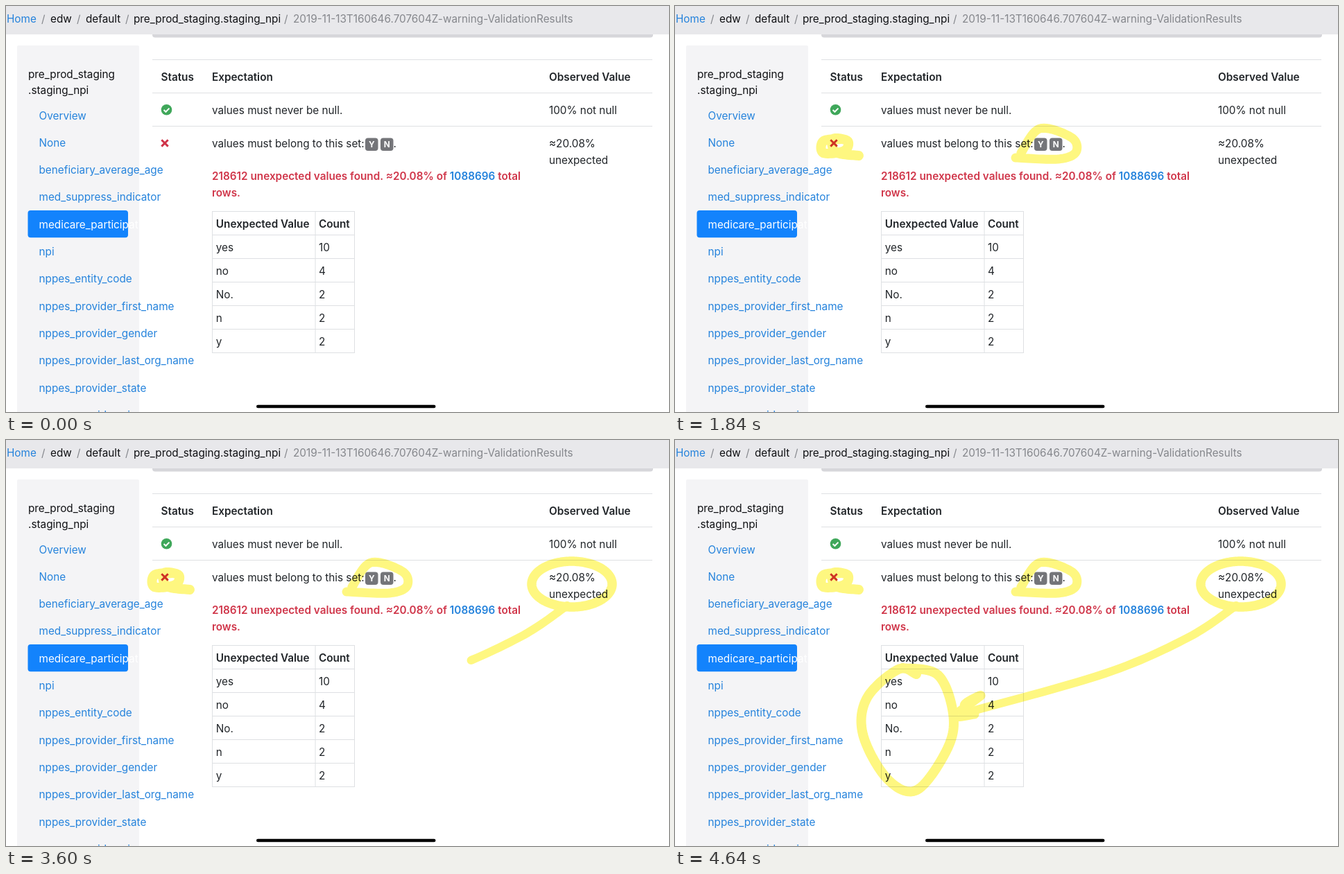
These frames come from a looping animation (956 px wide and 586 px high, 4740 ms). An HTML page with a canvas:

```html
<!DOCTYPE html>
<html lang="en">
<head>
<meta charset="utf-8">
<title>Validation results</title>
<style>
html, body { margin: 0; width: 100%; height: 100%; overflow: hidden; background: #fff; }
svg, canvas { position: absolute; left: 0; top: 0; width: 956px; height: 586px; }
canvas { mix-blend-mode: multiply; }
text { font: 15.3px Inter, "Open Sans", sans-serif; fill: #212529; white-space: pre; }
.b { font-weight: 600; }
.link { fill: #2583dc; }
.mute { fill: #85878c; }
.dark { fill: #101114; }
.red { fill: #d0364a; }
.white { fill: #fff; }
.tag { font-size: 11.8px; font-weight: 700; fill: #fff; }
</style>
</head>
<body>
<svg id="page" viewBox="0 0 956 586"></svg>
<canvas id="ink"></canvas>
<script>
const W = 956, H = 586, LOOP = 4740, STEP = 80;

// ---- static page ----
const text = (x, y, s, cls = '') => `<text x="${x}" y="${y}" class="${cls}">${s}</text>`;
const rect = (x, y, w, h, fill, r = 0) =>
  `<rect x="${x}" y="${y}" width="${w}" height="${h}" rx="${r}" fill="${fill}"/>`;
const line = (d, color = '#dee0e3', w = 1) =>
  `<path d="${d}" fill="none" stroke="${color}" stroke-width="${w}"/>`;

function header() {
  const slash = x => text(x, 24, '/', 'mute');
  return rect(211, 30, 722, 15.5, '#d6d6da', 4) + rect(0, 0, W, 41, '#e8e8eb') +
    text(1, 24, 'Home', 'link') + slash(51) +
    text(64, 24, 'edw', 'dark') + slash(102) +
    text(115, 24, 'default', 'dark') + slash(172) +
    text(184, 24, 'pre_prod_staging.staging_npi', 'dark') + slash(401) +
    text(414, 24, '2019-11-13T160646.707604Z-warning-ValidationResults', 'mute');
}

function sidebar() {
  const items = ['Overview', 'None', 'beneficiary_average_age', 'med_suppress_indicator',
    'medicare_participation_indicator', 'npi', 'nppes_entity_code',
    'nppes_provider_first_name', 'nppes_provider_gender', 'nppes_provider_last_org_name',
    'nppes_provider_state', 'nppes_provider_zip'];
  return rect(16, 57, 176, 540, '#f4f4f6', 2) + rect(31.5, 295, 144.5, 39.3, '#1383fc', 4) +
    text(32, 104, 'pre_prod_staging', 'dark') + text(32, 127, '.staging_npi', 'dark') +
    items.map((s, i) => text(47.5, 163.5 + i * 39.3, s, i === 4 ? 'white' : 'link')).join('');
}

function tag(x, letter) {
  return rect(x, 190.5, 18.5, 18.5, '#747579', 4) +
    `<text x="${x + 9.25}" y="204" class="tag" text-anchor="middle">${letter}</text>`;
}

function results() {
  let s = '';
  for (let i = 0; i < 3; i++) s += line(`M211 ${77.5 + i * 48}H932`);
  s += text(223.5, 108, 'Status', 'b') + text(297, 108, 'Expectation', 'b') +
    text(783, 108, 'Observed Value', 'b') +
    text(297, 155.5, 'values must never be null.') + text(783, 155.5, '100% not null') +
    text(297, 204, 'values must belong to this set:') + text(558.5, 204, '.') +
    text(783, 204, '≈20.08%') + text(783, 227.5, 'unexpected') +
    text(297, 251, '218612 unexpected values found. ≈20.08% of <tspan class="link">1088696</tspan> total', 'b red') +
    text(297, 274.5, 'rows.', 'b red');
  s += '<circle cx="231.5" cy="149.8" r="7.8" fill="#3fa75a"/>' +
    line('M227.6 150l2.8 2.8 5-5.2', '#fff', 2) +
    line('M224.3 193.2l9.4 9.4m0-9.4l-9.4 9.4', '#cf3348', 2.9);
  return s + tag(518, 'Y') + tag(540, 'N');
}

function counts() {
  const rows = [['Unexpected Value', 'Count'], ['yes', 10], ['no', 4], ['No.', 2], ['n', 2], ['y', 2]];
  let s = line('M297.5 296V501M446 296V501M502.5 296V501');
  for (let i = 0; i <= rows.length; i++) s += line(`M297 ${296.5 + i * 34}H503`);
  rows.forEach(([value, count], i) => {
    const y = 319.5 + i * 34, cls = i ? '' : 'b';
    s += text(302.8, y, value, cls) + text(451, y, count, cls);
  });
  return s;
}

document.getElementById('page').innerHTML = rect(0, 0, W, H, '#fff') + header() + sidebar() +
  results() + counts() + rect(361, 575.7, 258.5, 4.6, '#000', 2.3);

// ---- highlighter ----
// Catmull-Rom curve sampled into short segments
function smooth(p) {
  const out = [], at = i => p[Math.max(0, Math.min(p.length - 1, i))];
  for (let i = 0; i < p.length - 1; i++) {
    for (let k = 0; k < 14; k++) {
      const u = k / 14;
      out.push([0, 1].map(j => {
        const a = at(i - 1)[j], b = at(i)[j], c = at(i + 1)[j], d = at(i + 2)[j];
        return b + u * (c - a) / 2 + u * u * (a - 2.5 * b + 2 * c - d / 2) +
          u * u * u * (1.5 * (b - c) + (d - a) / 2);
      }));
    }
  }
  out.push(p[p.length - 1]);
  return out;
}

// counter-clockwise closed loop
function ring(cx, cy, rx, ry, start) {
  return Array.from({ length: 25 }, (_, i) => {
    const a = start - i / 24 * 2 * Math.PI;
    return [cx + rx * Math.cos(a), cy + ry * Math.sin(a)];
  });
}

const strokes = [];
const mark = (from, to, width, pts) => strokes.push({ from, to, width, pts: smooth(pts) });

mark(40, 480, 14, [[240, 192], [214, 195], [214, 212], [244, 209], [249, 195], [228, 192], [232, 211], [265, 216]]);
mark(600, 1440, 13, [[491, 219], [552, 221], [578, 211], [572, 190], [526, 177], [499, 212]]);
mark(1960, 2720, 13.5, ring(816, 208, 58, 33, -1.3));
mark(3440, 3860, 12, [[809, 239], [740, 285], [620, 337], [422, 393]]);
mark(3860, 4030, 13, [[422, 393], [418, 381], [441, 369], [404, 398], [432, 396]]);
mark(4040, 4640, 14, [[348, 338], [322, 331], [277, 372], [271, 425], [306, 489], [349, 505],
  [393, 445], [401, 395], [379, 339], [328, 329]]);

const canvas = document.getElementById('ink'), ctx = canvas.getContext('2d');
const scale = window.devicePixelRatio || 1;
canvas.width = W * scale;
canvas.height = H * scale;
ctx.scale(scale, scale);
ctx.lineCap = ctx.lineJoin = 'round';
ctx.strokeStyle = '#fef780';

function drawStroke({ from, to, width, pts }, t) {
  if (t <= from) return;
  const lens = pts.map((p, i) => i ? Math.hypot(p[0] - pts[i - 1][0], p[1] - pts[i - 1][1]) : 0);
  let left = lens.reduce((a, b) => a + b) * Math.min(1, (t - from) / (to - from));
  ctx.lineWidth = width;
  ctx.beginPath();
  ctx.moveTo(...pts[0]);
  for (let i = 1; i < pts.length && left > 0; i++) {
    const u = Math.min(1, left / (lens[i] || 1)), [x, y] = pts[i - 1];
    ctx.lineTo(x + (pts[i][0] - x) * u, y + (pts[i][1] - y) * u);
    left -= lens[i];
  }
  ctx.stroke();
}

function frame() {
  const t = Math.floor(performance.now() % LOOP / STEP) * STEP;
  ctx.clearRect(0, 0, W, H);
  strokes.forEach(s => drawStroke(s, t));
  requestAnimationFrame(frame);
}
frame();
</script>
</body>
</html>
```
